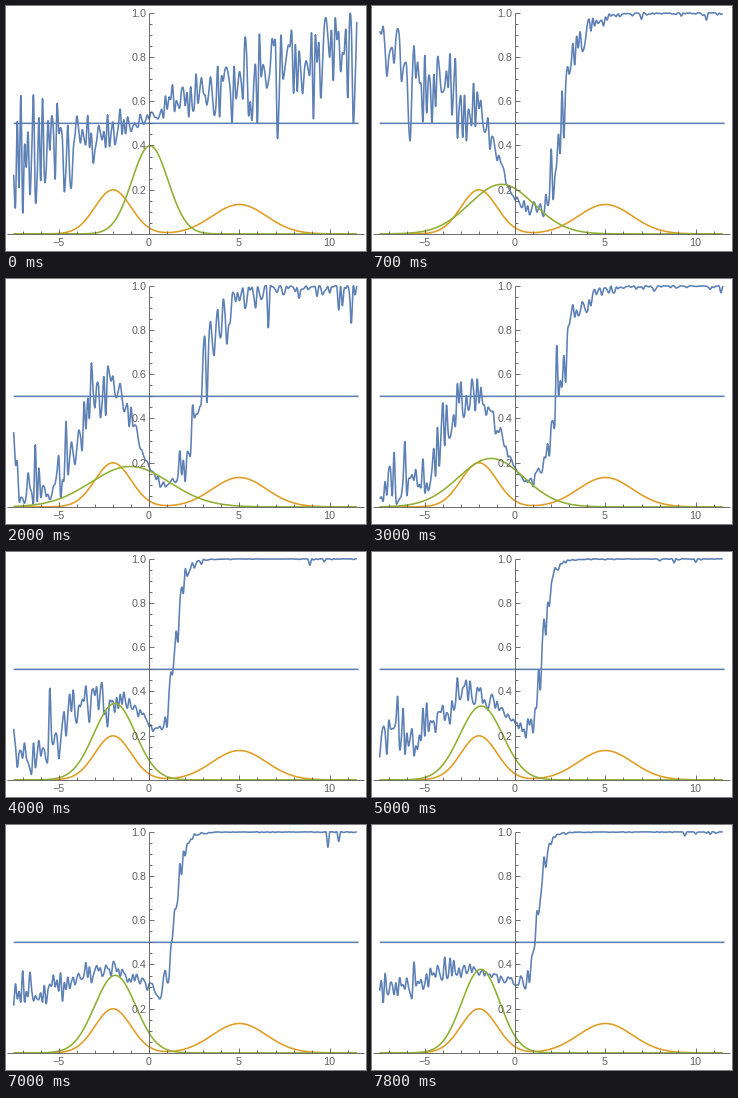
These frames come from a looping animation (360x245 px, 8 s). A matplotlib script:

```python
import numpy as np
import matplotlib.pyplot as plt
from matplotlib.animation import FuncAnimation
from matplotlib.patches import Rectangle

W, H, DPI = 360, 245, 100
PX = 72 / DPI                      # points per pixel
X0, Y0 = 143.1, 227.9              # pixel position of the axes' crossing
SX, SY = 18.06, 221.1              # pixels per unit
LO, HI = -7.5, 11.5
BLUE, ORANGE, GREEN, GRAY = "#5E81B5", "#E19C24", "#8FB032", "0.38"

# Generator's path: step, mean, sigma
PATH = np.array([(0, 0.05, 1.0), (4, -0.75, 1.78), (12, -1.05, 2.18),
                 (18, -1.33, 1.82), (24, -1.9, 1.153), (36, -1.85, 1.235),
                 (47, -1.9, 1.056)]).T

SAMPLES, SUB = 191, 8
xs = np.linspace(LO, HI, SAMPLES)
fine = np.linspace(LO, HI, (SAMPLES - 1) * SUB + 1)
smooth = np.linspace(LO, HI, 400)


def gauss(x, mean, sigma):
    return np.exp(-((x - mean) / sigma) ** 2 / 2) / (sigma * np.sqrt(2 * np.pi))


def data(x):
    return (gauss(x, -2, 1) + gauss(x, 5, 1.5)) / 2


def generator(x, k):
    step, mean, sigma = PATH
    return gauss(x, np.interp(k, step, mean), np.interp(k, step, sigma))


def spline(y):
    """Cubic curve through evenly spaced values."""
    m = np.gradient(y)
    t = np.arange(SUB) / SUB
    a, b, ma, mb = (v[:, None] for v in (y[:-1], y[1:], m[:-1], m[1:]))
    s = t * t * (3 - 2 * t)
    seg = a + (b - a) * s + ma * t * (1 - t) ** 2 - mb * t * t * (1 - t)
    return np.append(seg.ravel(), y[-1])


def discriminator(k):
    """Noisy, saturating log ratio of data to generator."""
    learned = min(k / 3, 1)
    unsettled = 1 / (1 + np.exp((k - 29) / 2))

    z = np.log(data(xs) / generator(xs, k))
    floor = 1 + 1.5 * unsettled
    z = np.where(z < 0, floor * np.tanh(z / floor), 7 * np.tanh(z / 8))
    z += 1.2 * np.maximum(0, -2.8 - xs) * np.exp(-(k / 6) ** 4)
    z = (1 - learned) * (0.13 + 0.14 * xs) + learned * z

    r = np.abs(xs) / 7
    left = (0.15 + 0.75 * unsettled) * r ** 1.5
    right = (0.6 + 0.4 * learned) * r
    noise = np.random.default_rng(70 + k).standard_normal(SAMPLES)
    z += (0.06 + np.where(xs < 0, left, right)) * noise
    return np.minimum(spline(1 / (1 + np.exp(-z))), 1)


fig = plt.figure(figsize=(W / 100, H / 100), dpi=DPI, facecolor="white")
ax = fig.add_axes([0, 0, 1, 1])
ax.set_xlim(-X0 / SX, (W - X0) / SX)
ax.set_ylim((Y0 - H) / SY, Y0 / SY)
ax.axis("off")


def curve(x, y, color):
    line, = ax.plot(x, y, color=color, lw=1.6 * PX, solid_capstyle="butt",
                    solid_joinstyle="round", snap=False)
    line.set_clip_path(Rectangle((-8, 0), 20, 1.005, transform=ax.transData))
    return line


def rule(x, y):
    ax.plot(x, y, color=GRAY, lw=0.9 * PX, solid_capstyle="butt", zorder=5)


def label(x, y, text, ha):
    ax.text(x, y, text, ha=ha, va="center_baseline", color=GRAY, zorder=6,
            family="Liberation Sans", size=10.7 * PX)


critic = curve(fine, fine * 0, BLUE)
curve(smooth, data(smooth), ORANGE)
model = curve(smooth, smooth * 0, GREEN)
curve([LO, 11.6], [0.5, 0.5], BLUE)

rule([-7.88, 11.88], [0, 0])
rule([0, 0], [0, 1])
for n in range(-7, 12):
    major = n % 5 == 0
    rule([n, n], [0, (4.5 if major else 2.7) / SY])
    if major:
        label(n - 0.02, -8.2 / SY, str(n).replace("-", "\u2212"), "center")
for n in range(1, 21):
    major = n % 4 == 0
    rule([0, (4.5 if major else 2.7) / SX], [n / 20, n / 20])
    if major:
        label(-3 / SX, n / 20, f"{n / 20:.1f}", "right")


def update(i):
    k = (2 * i + 1) * 3 // 10      # six training steps per second
    critic.set_ydata(discriminator(k))
    model.set_ydata(generator(smooth, k))
    return critic, model


anim = FuncAnimation(fig, update, frames=80, interval=100, repeat=True,
                     repeat_delay=0)
plt.show()
```
